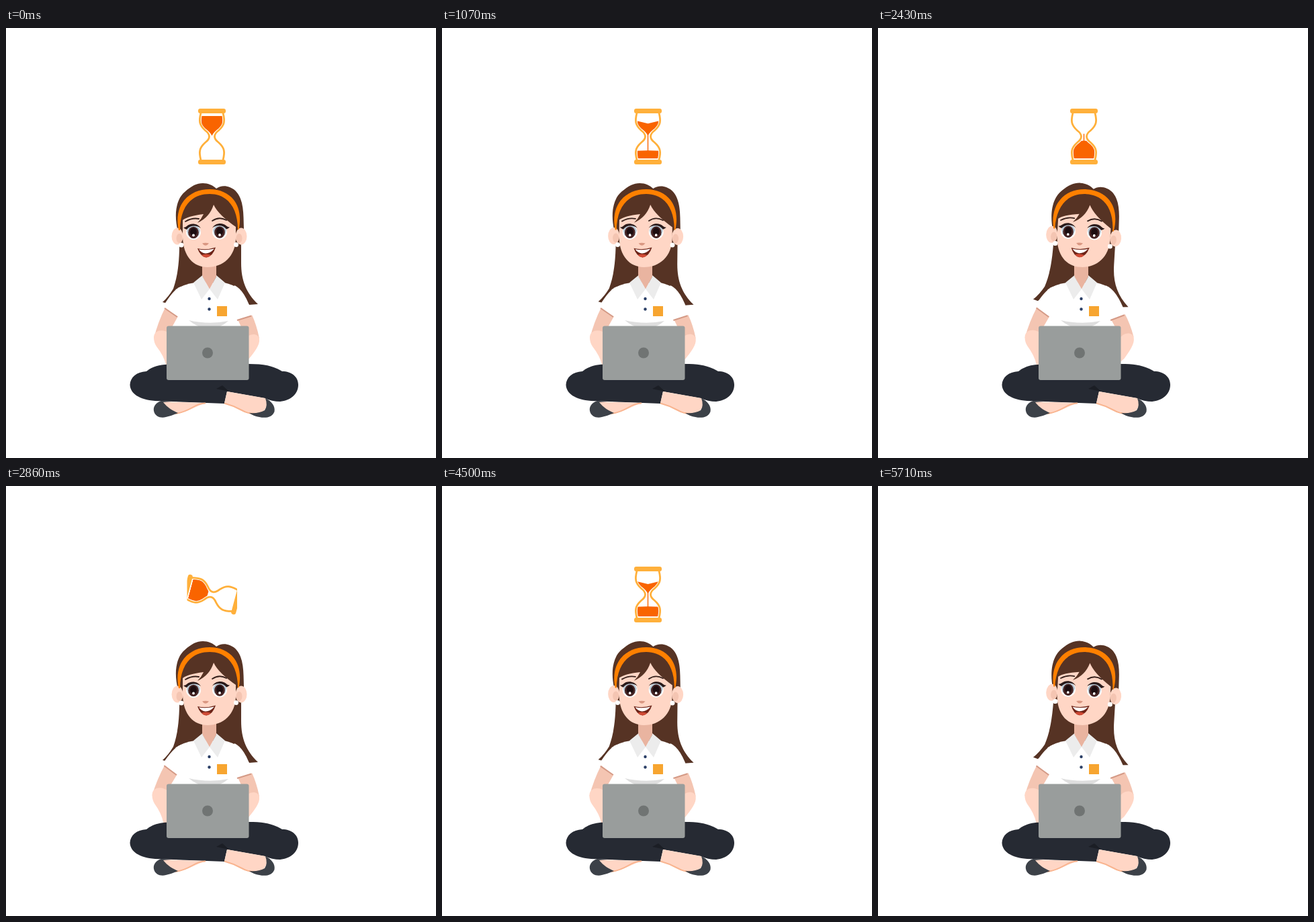
Write an HTML page that moves like this. It is 640 px wide and 640 px high and loops after 5780 ms.

```html
<!DOCTYPE html>
<html lang="en">
<head>
<meta charset="utf-8">
<title>Waiting at the laptop</title>
<style>
  html, body { margin: 0; width: 100%; height: 100%; overflow: hidden; background: #fff; }
  svg { display: block; width: 100vw; height: 100vh; }
  .hair { fill: #563324; }
  .skin { fill: #ffd6c5; }
  .shade { fill: #f4c5b2; }
  .fold { fill: none; stroke: #d49a86; stroke-width: 2; }
  .pants { fill: #262a33; }
  .shoe { fill: #3c4148; }
  .brow { fill: none; stroke: #35201b; stroke-width: 1.8; stroke-linecap: round; }
  .sole { fill: none; stroke: #f9b48f; stroke-width: 2; }
  .glass { fill: none; stroke: #ffb03b; stroke-width: 2.8; }
  .sand { fill: #f96400; }
</style>
</head>
<body>
<svg viewBox="0 0 640 640">
  <defs>
    <clipPath id="window"><rect x="269.5" y="110" width="74.5" height="100"/></clipPath>
    <path id="bulb" d="M-14.500 -33 C-17 -22 -16 -18 -10 -12 C-5 -8 -1.500 -5 0 -1 C1.500 -5 5 -8 10 -12 C16 -18 17 -22 14.500 -33Z"/>
    <clipPath id="topBulb"><use href="#bulb"/></clipPath>
    <clipPath id="bottomBulb"><use href="#bulb" transform="scale(1 -1)"/></clipPath>
    <path id="side" class="glass" d="M-16.500 -35 C-19.500 -23 -19 -17 -10 -9 C-2 -3 -2 3 -10 9 C-19 17 -19.500 23 -16.500 35"/>
    <g id="eye">
      <ellipse rx="11" ry="11" fill="#fff"/>
      <path fill="#b9cad6" d="M-10 -2 C-8 -13 8 -13 10 -2 L8 5 H-8Z"/>
      <ellipse cy=".5" rx="7.800" ry="8.800" fill="#442323"/>
      <ellipse cy="-.5" rx="5" ry="6" fill="#1c0d10"/>
      <circle cy="4.5" r="1.900" fill="#fff"/>
      <path fill="#2a1a1a" d="M-15 -7 Q-12 -7 -10 -9 C-5 -14 6 -14 11 -6 C5 -11 -5 -11 -10 -4 Q-13 -5 -15 -7Z"/>
    </g>
  </defs>

  <g clip-path="url(#window)">
    <g id="hourglass">
      <use href="#side"/>
      <use href="#side" transform="scale(-1 1)"/>
      <g class="sand">
        <path id="topSand" clip-path="url(#topBulb)"/>
        <path id="bottomSand" clip-path="url(#bottomBulb)"/>
        <rect id="stream" x="-.7" y="-4" width="1.4"/>
      </g>
      <g fill="#ffb03b">
        <rect x="-20.5" y="-41.5" width="41" height="7" rx="3"/>
        <rect x="-20.5" y="34.5" width="41" height="7" rx="3"/>
      </g>
    </g>
  </g>

  <g id="backHair" class="hair">
    <path d="M258 300 C259 345 256 368 249 388 Q242 400 233 408 L240 410 L264 390 L344 390 L362 412 L375 411 C357 394 350 375 350 350 L350 300Z"/>
  </g>

  <path d="M281 379 Q262 382 252 390 L250 470 H352 L346 388 Q338 382 325 379Z" fill="#fff"/>
  <path d="M292 345 H313 V370 L303 389 L292 370Z" fill="#e9b4a0"/>

  <g id="leftArm">
    <path class="shade" d="M237 416 L256 429 L240 458 L220 462 Q226 438 237 416Z"/>
    <path class="skin" d="M220 461 C220 448 236 448 244 455 V508 L238 501 Q235 488 224 474 Q220 468 220 461Z"/>
    <path d="M260 385 Q250 388 234 414 L255 430 L272 405Z" fill="#fff"/>
    <path class="fold" d="M236 417 L255 430"/>
  </g>
  <g id="rightArm">
    <path class="shade" d="M345 434 L366 427 Q373 442 377 462 L358 462Z"/>
    <path class="skin" d="M356 464 C360 454 376 453 377 463 C378 472 370 482 361 493 L352 500Z"/>
    <path d="M340 383 Q356 390 367 427 L345 435 L332 405Z" fill="#fff"/>
    <path class="fold" d="M344 435 L365 428.500"/>
  </g>

  <path d="M272 435 Q302 442 331 436 Q320 446 302 448 Q285 446 272 435Z" fill="#dedede"/>
  <g fill="#ececec">
    <path d="M292.500 368 L279 379 L291 404 L303 388.500 L292.500 370Z"/>
    <path d="M313 368 L326 379 L315 404 L303 388.500 L313 370Z"/>
  </g>
  <g fill="#2b3f66"><circle cx="302.500" cy="403" r="2.200"/><circle cx="302.500" cy="418.500" r="2.200"/></g>
  <rect x="314" y="414" width="15" height="15" fill="#f7a530"/>

  <g id="head">
    <path class="hair" d="M256 303 C250 280 252 256 266 244 C276 235 284 231 293 231 C301 231 308 234 313 239 C318 235 326 234 333 237 C349 243 353 262 353.500 282 L354 299 L346 325 L261 325Z"/>
    <g class="skin"><ellipse cx="255" cy="310" rx="8.500" ry="12.500"/><ellipse cx="350" cy="310" rx="8.500" ry="12.500"/></g>
    <g class="shade"><ellipse cx="258" cy="313" rx="4.500" ry="7"/><ellipse cx="347" cy="313" rx="4.500" ry="7"/></g>
    <path class="skin" d="M263 286 Q270 280 294 277 Q291 284 285 290 Q303 282 309 263 Q316 278 342 296 V312 C342 340 323 356 300 356 C279 356 264 340 263 312Z"/>
    <path fill="#ff8000" d="M257 301 C249 263 272 240 303 240 C334 240 354 263 346.500 300 L345 300 C345 268 330 247 303 247 C276 247 259 266 259 301Z"/>
    <path class="brow" d="M267 288 Q277 282 287 284 M307 287 Q317 280 328 286"/>
    <g id="eyes">
      <use href="#eye" x="279" y="304"/>
      <use href="#eye" transform="translate(318 303.500) scale(-1 1)"/>
    </g>
    <path fill="#d99782" d="M292 320.500 Q297 319 302 320.500 Q297 327 292 320.500Z"/>
    <path fill="#6d2418" d="M285 328 Q298 331 312 326.500 Q308 340 298 341.500 Q289 340 285 328Z"/>
    <path fill="#fff" d="M287 329.500 Q298 331.500 310 328.500 Q304 335.500 297 335.500 Q291 335 287 329.500Z"/>
    <path fill="#cf4a35" d="M291 338 Q298 335 305 338 Q302 341.500 298 341.500 Q294 341.500 291 338Z"/>
    <g fill="#fff"><circle cx="261" cy="323" r="3.500"/><circle cx="342.500" cy="322.500" r="3.500"/></g>
  </g>

  <path class="pants" d="M245 501 C230 500 218 504 209 511 C194 512 185 520 184.500 531 C185 544 198 553 222 555 L325 559 L329 541 L385 551 Q396 556 408 556 C424 554 435 545 435 531 C435 519 425 511 411 511 C398 503 385 500 361 500Z"/>
  <path d="M313 537 L322 532 L332 541Z" fill="#1b1e25"/>
  <path class="skin" d="M232 556 L298 558 C284 562 270 572 255 574 C243 572 236 565 232 556Z"/>
  <path class="sole" d="M252 574 Q265 572 277 565 T297 558.500"/>
  <path class="shoe" d="M246 556 L231 555 C222 558 219 564 220 570 C222 579 231 581 238 579 Q247 577 256 573 C249 570 240 565 234 557Z"/>
  <path class="skin" d="M329 541 L386 551 C391 560 387 571 376 574 C360 574 345 565 325 558Z"/>
  <path class="sole" d="M325 558.500 Q338 562 349 568 T370 574"/>
  <path class="shoe" d="M386 551 C396 556 401 563 399.500 571 C396 580 386 581 377 579 Q369 578 362 573 Q377 574 385 569 Q390 562 386 551Z"/>

  <rect x="239" y="443.500" width="122.500" height="80.500" rx="3" fill="#999d9c"/>
  <circle cx="300" cy="483.500" r="8" fill="#707473"/>
</svg>
<script>
const LOOP = 5780, SWAY = 400;
const UPRIGHT = [0, 1143, 2858, 4573];   // moments when the head is straight
const BLINKS = [2000, 3715, 5430];
const FLIP_START = 2500, FLIP_END = 3150, VANISH = 5700, DRAIN = 2450;

const $ = id => document.getElementById(id);
const clamp = x => Math.max(0, Math.min(1, x));
const smooth = x => x * x * (3 - 2 * x);
const nearest = (t, moments) => Math.min(...moments.map(m => Math.abs(t - m)));
const set = (id, name, value) => $(id).setAttribute(name, value);
const turn = (id, angle, x, y) => set(id, "transform", `rotate(${angle} ${x} ${y})`);

function drawHourglass(t) {
  const angle = 180 * smooth(clamp((t - FLIP_START) / (FLIP_END - FLIP_START)));
  const flipped = t >= FLIP_END;
  const drained = clamp((flipped ? t - FLIP_END : t) / DRAIN);
  const level = -30.5 + 33 * drained ** 2;
  const dip = 5 * Math.min(1, drained * 3);
  const heap = 33 - 26 * drained;
  const mound = 2 * Math.min(1, drained * 3);
  const flowing = drained > 0.02 && drained < 1;

  set("hourglass", "transform", `translate(306.5 161.5) rotate(${flipped ? 0 : angle})`);
  set("hourglass", "visibility", t < VANISH ? "visible" : "hidden");
  set("topSand", "d", drained < 1 ? `M-20 ${level} L0 ${level + dip} L20 ${level} V0 H-20Z` : "");
  set("bottomSand", "d", `M-20 ${heap} Q0 ${heap - mound} 20 ${heap} V33 H-20Z`);
  set("stream", "height", flowing ? heap + 4 : 0);
}

function draw(t) {
  const sway = clamp(nearest(t, UPRIGHT) / SWAY);
  turn("head", 3.4 * sway, 303, 372);
  turn("backHair", 3.4 * sway, 303, 372);
  turn("rightArm", -3.4 * sway, 345, 400);
  turn("leftArm", 1.4 * (1 - Math.cos(2 * Math.PI * t / 1085)), 255, 400);

  const open = 0.1 + 0.9 * clamp(nearest(t, BLINKS) / 100);
  set("eyes", "transform", `translate(0 ${304 * (1 - open)}) scale(1 ${open})`);
  drawHourglass(t);
}

function tick() {
  draw(performance.now() % LOOP);
  requestAnimationFrame(tick);
}
tick();
</script>
</body>
</html>
```
